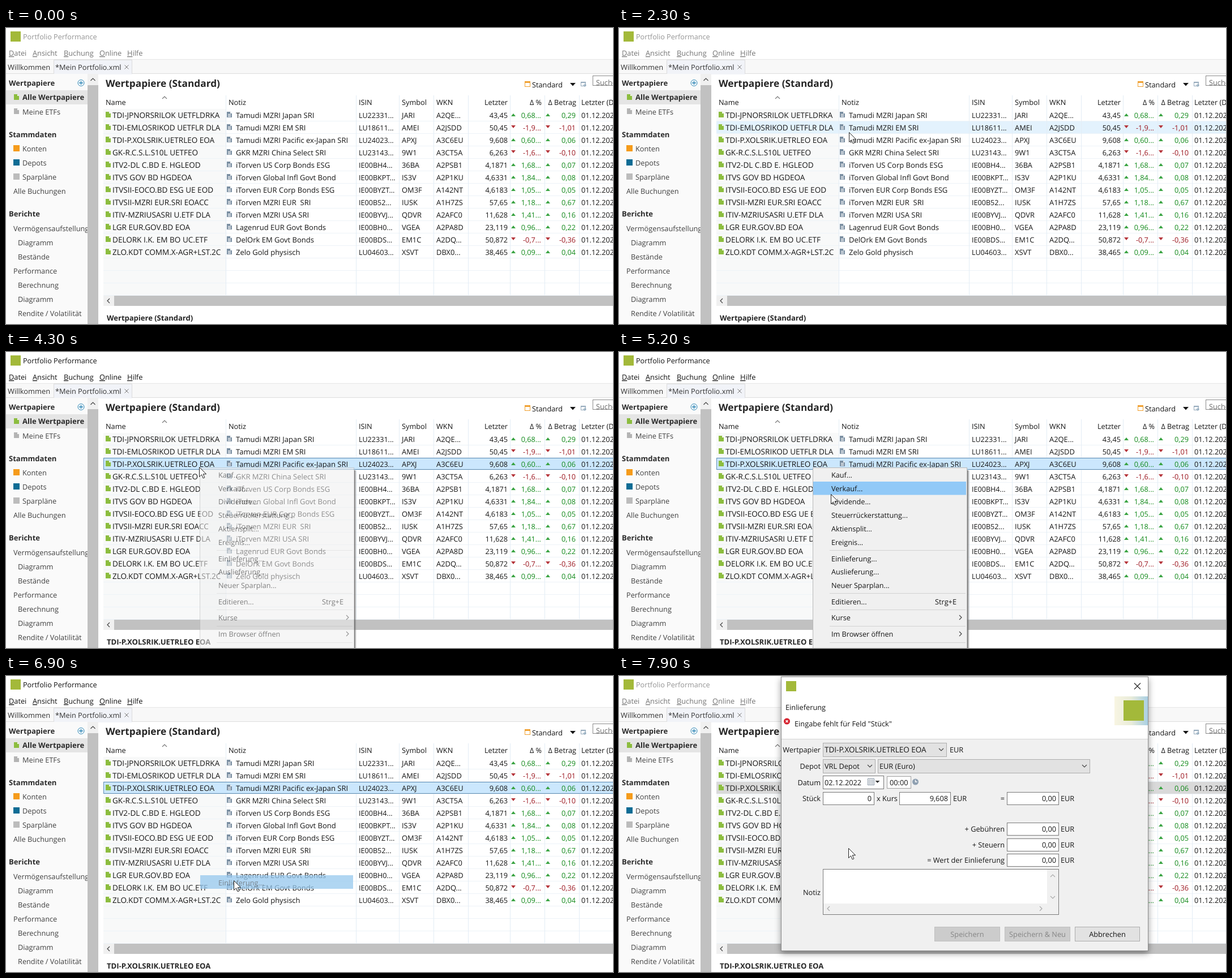
Animation, 1072 px wide and 523 px high, one loop 8000 ms. Source, as an HTML page:

```html
<!DOCTYPE html>
<html lang="de">
<head>
<meta charset="utf-8">
<title>Wertpapiere</title>
<style>
html, body { margin: 0; width: 100%; height: 100%; overflow: hidden; background: #fff; }
svg { display: block; width: 100%; height: 100%; }
text { font-family: "Open Sans", "Noto Sans", sans-serif; white-space: pre; text-rendering: geometricPrecision; }
</style>
</head>
<body>
<svg id="stage" viewBox="0 0 1072 523" xmlns="http://www.w3.org/2000/svg"></svg>
<script>
const LOOP = 8000;
const INK = '#161616', GREEN = '#138a1c', RED = '#9c1720', LOGO = '#a3b93a', BAR = '#c1c1c1';

const rect = (x, y, w, h, fill, more = '') =>
  `<rect x="${x}" y="${y}" width="${w}" height="${h}" fill="${fill}" ${more}/>`;
const box = (x, y, w, h, fill, line) => rect(x + .5, y + .5, w - 1, h - 1, fill, `stroke="${line}"`);
const path = (d, fill = 'none', line = 'none', width = 1) =>
  `<path d="${d}" fill="${fill}" stroke="${line}" stroke-width="${width}"/>`;
// y is the vertical centre of the line; the baseline sits on a whole pixel
const text = (x, y, s, { size = 12.75, fill = INK, bold = 0, end = 0, more = '' } = {}) =>
  `<text x="${x}" y="${Math.round(y + size * .36)}" font-size="${size}" fill="${fill}"${bold ? ' font-weight="700"' : ''}` +
  `${end ? ' text-anchor="end"' : ''} ${more}>${s.replace(/&/g, '&amp;')}</text>`;
const group = (id, body, more = '') => `<g id="${id}" ${more}>${body}</g>`;
const page = (x, y, fill) => path(`M${x} ${y}h6l3 3v7h-9z`, fill) + path(`M${x + 6} ${y}v3h3z`, '#fff');
const note = (x, y) => page(x, y, '#7b8fa2') + path(`M${x + 2} ${y + 4.5}h5m-5 2h5m-5 2h5`, 'none', '#fff');
const chevron = (x, y, dx, dy, line = '#444') => dx
  ? path(`M${x - 2 * dx} ${y - 4}l${4 * dx} 4l${-4 * dx} 4`, 'none', line, 1.2)
  : path(`M${x - 4} ${y - 2 * dy}l4 ${4 * dy}l4 ${-4 * dy}`, 'none', line, 1.2);

const FUND = 'TDI-P.XOLSRIK.UETRLEO EOA';
const rows = [
  'TDI-JPNORSRILOK UETFLDRKA|Tamudi MZRI Japan SRI|LU22331...|JARI|A2QE...|43,45|0,68...|0,29',
  'TDI-EMLOSRIKOD UETFLR DLA|Tamudi MZRI EM SRI|LU18611...|AMEI|A2JSDD|50,45|-1,9...|-1,01',
  FUND + '|Tamudi MZRI Pacific ex-Japan SRI|LU24023...|APXJ|A3C6EU|9,608|0,60...|0,06',
  'GK-R.C.S.L.S10L UETFEO|GKR MZRI China Select SRI|LU23143...|9W1|A3CT5A|6,263|-1,6...|-0,10',
  'ITV2-DL C.BD E. HGLEOD|iTorven US Corp Bonds ESG|IE00BH4...|36BA|A2PSB1|4,1871|1,68...|0,07',
  'ITVS GOV BD HGDEOA|iTorven Global Infl Govt Bond|IE00BKPT...|IS3V|A2P1KU|4,6331|1,84...|0,08',
  'ITVSII-EOCO.BD ESG UE EOD|iTorven EUR Corp Bonds ESG|IE00BYZT...|OM3F|A142NT|4,6183|1,05...|0,05',
  'ITVSII-MZRI EUR.SRI EOACC|iTorven MZRI EUR  SRI|IE00B52...|IUSK|A1H7ZS|57,65|1,18...|0,67',
  'ITIV-MZRIUSASRI U.ETF DLA|iTorven MZRI USA SRI|IE00BYVJ...|QDVR|A2AFC0|11,628|1,41...|0,16',
  'LGR EUR.GOV.BD EOA|Lagenrud EUR Govt Bonds|IE00BH0...|VGEA|A2PA8D|23,119|0,96...|0,22',
  'DELORK I.K. EM BO UC.ETF|DelOrk EM Govt Bonds|IE00BDS...|EM1C|A2DQ...|50,872|-0,7...|-0,36',
  'ZLO.KDT COMM.X-AGR+LST.2C|Zelo Gold physisch|LU04603...|XSVT|DBX0...|38,465|0,09...|0,04'
].map(r => r.split('|'));
const edges = [172, 388, 618, 694, 755, 816, 890, 951, 1012, 1090];
const ROW = 22, TOP = 143;
const rowY = i => TOP + ROW * i;

function drawTop() {
  let s = rect(8, 6, 18, 18, LOGO);
  s += group('appName', text(30, 15.5, 'Portfolio Performance', { size: 12.65, fill: 'currentColor' }));
  s += group('menubar', [[5, 'Datei'], [47, 'Ansicht'], [102, 'Buchung'], [165, 'Online'], [214, 'Hilfe']].map(([x, w]) =>
    text(x, 44, `<tspan text-decoration="underline">${w[0]}</tspan>${w.slice(1)}`, { fill: 'currentColor' })).join(''));
  s += rect(0, 55, 1072, 26, '#f8f8f8') + rect(0, 55, 1072, 1, '#e6e6e6') + rect(0, 80, 1072, 1, '#dedede');
  s += rect(84, 56, 139, 26, '#f1f3f8') + path('M84.5 81V56.500H222.500V81', 'none', '#dcdcdc');
  s += text(3, 69.5, 'Willkommen', { size: 12.9, fill: '#333' }) + text(87, 69.5, '*Mein Portfolio.xml', { fill: '#333' });
  return s + path('M209.500 65.500l7 7m0-7l-7 7', 'none', '#777');
}

function drawSidebar() {
  const heads = [[5, 97, 'Wertpapiere'], [29, 122.5, 'Alle Wertpapiere'], [5, 188, 'Stammdaten'], [5, 328.5, 'Berichte']];
  const items = [[29, 148, 'Meine ETFs'], [29, 213.5, 'Konten'], [29, 238.5, 'Depots'], [29, 263.5, 'Sparpläne'],
    [13, 288.5, 'Alle Buchungen'], [13, 354, 'Vermögensaufstellung'], [21, 379, 'Diagramm'], [21, 404, 'Bestände'],
    [13, 429, 'Performance'], [21, 454, 'Berechnung'], [21, 479, 'Diagramm'], [21, 504, 'Rendite / Volatilität']];
  let s = rect(0, 81, 144, 442, '#fafafa') + rect(0, 110, 144, 25, '#e5e5e5');
  s += heads.map(([x, y, w]) => text(x, y, w, { size: 13.05, bold: 1, fill: '#2c2c2c' })).join('');
  s += items.map(([x, y, w]) => text(x, y, w, { fill: '#404040' })).join('');
  s += page(14, 117, '#8cbd3f') + page(14, 142, '#b4b4b4');
  s += ['#f59b1b', '#0e6c94', '#bcbcbc'].map((c, i) => rect(13, 207 + 25 * i, 11, 11, c)).join('');
  s += `<circle cx="132.500" cy="97" r="5.500" fill="#fff" stroke="#2f86b5"/>` + path('M129 97h7m-3.500-3.500v7', 'none', '#2f86b5', 1.4);
  return `<g clip-path="url(#side)">${s}</g>` + rect(144, 81, 19, 442, '#f0f0f0') +
    rect(144, 101, 19, 422, BAR) + chevron(153.5, 91, 0, -1);
}

function drawTable() {
  let s = text(176, 98, 'Wertpapiere (Standard)', { size: 17.25, bold: 1, fill: '#262626' });
  s += rect(916.5, 95.5, 9, 8, '#fff', 'stroke="#f0a030"') + rect(916, 94, 10, 3, '#f0a030');
  s += text(929, 100, 'Standard') + path('M996 97h10l-5 5.500z', INK);
  s += rect(1015.5, 95.5, 8, 7, '#fff', 'stroke="#93a8ba"') + rect(1015, 95, 9, 2, '#93a8ba') + path('M1019 101h6m-3-3v6', 'none', '#8aa6ba');
  s += rect(1036.5, 84.5, 60, 17, '#fff', 'stroke="#8a8a8a"') +
    `<g clip-path="url(#search)">${text(1042, 96.5, 'Suchen', { fill: '#6c6c6c' })}</g>`;
  s += rect(172, TOP, 216, 329, '#f8f9f9') + group('head', '') + group('hover', '');
  for (let i = 1; i < 16; i++) s += rect(172, rowY(i) - 1, 900, 1, '#edf3f8');
  s += edges.slice(1, -1).map(x => rect(x, 119, 1, 353, '#e3edf5')).join('');
  s += group('pick', '');
  s += [[176, 'Name'], [393, 'Notiz'], [623, 'ISIN'], [699, 'Symbol'], [760, 'WKN'], [1016, 'Letzter (Datum)']]
    .map(([x, w]) => text(x, 131.5, w)).join('');
  s += [[886, 'Letzter'], [946, 'Δ %'], [1007, 'Δ Betrag']].map(([x, w]) => text(x, 131.5, w, { end: 1 })).join('');
  s += chevron(280, 123, 0, -1, '#777');
  rows.forEach((r, i) => {
    const y = rowY(i) + ROW / 2, down = r[6][0] === '-', fill = down ? RED : GREEN;
    const mark = x => path(down ? `M${x - 4} ${y - 4}h8l-4 5z` : `M${x - 4} ${y + 2}h8l-4-5z`, down ? '#b5353b' : '#3aa443');
    s += page(176, y - 6, '#8cbd3f') + text(188, y, r[0], { size: 13.55 });
    s += note(390, y - 6) + text(406, y, r[1], { size: 13 });
    s += text(623, y, r[2], { size: 12.6 }) + text(699, y, r[3], { size: 12.9 }) + text(760, y, r[4], { size: 12.9 });
    s += text(886, y, r[5], { end: 1 }) + mark(896) + text(945, y, r[6], { end: 1, fill });
    s += mark(957) + text(1006, y, r[7], { end: 1, fill }) + text(1016, y, '01.12.2022');
  });
  s += rect(172, 473, 900, 18, '#f0f0f0') + rect(191, 473, 881, 18, BAR) + chevron(181, 482, -1, 0);
  return s + group('titleAll', text(178, 512, 'Wertpapiere (Standard)', { size: 13, bold: 1, fill: '#262626' })) +
    group('titleOne', text(178, 512, FUND, { size: 13.1, bold: 1, fill: '#262626' }));
}

const items = [[217.5, 'Kauf...'], [241, 'Verkauf...'], [264.5, 'Dividende...'], [288.5, 'Steuerrückerstattung...'],
  [312, 'Aktiensplit...'], [336, 'Ereignis...'], [365, 'Einlieferung...'], [388.5, 'Auslieferung...'],
  [412, 'Neuer Sparplan...'], [441, 'Editieren...'], [469.5, 'Kurse'], [498.5, 'Im Browser öffnen'], [528, 'Wertpapier laden']];

function drawMenu() {
  let s = box(342, 204, 273, 340, '#f0f0f0', '#b8b8b8') + group('menuHover', '');
  s += items.map(([y, w]) => text(375, y, w, { size: 12.65 })).join('');
  s += [350, 426, 455, 484, 513].map(y => rect(372, y, 240, 1, '#d2d2d2')).join('');
  s += text(596, 441, 'Strg+E', { end: 1 }) + chevron(603, 469, 1, 0) + chevron(603, 498, 1, 0);
  return group('shadow', rect(615, 209, 2, 320, '#666', 'opacity=".75"') + rect(617, 210, 2, 320, '#888', 'opacity=".25"')) + group('menu', s);
}

function drawDialog() {
  const label = (x, y, w) => text(x, y, w, { end: 1 });
  const field = (x, y, w, value) => box(x, y, w, 23, '#fff', '#7a7a7a') + text(x + w - 5, y + 11.5, value, { end: 1 });
  const combo = (x, y, w, value, size) => box(x, y, w, 25, '#e2e2e2', '#adadad') +
    text(x + 3, y + 12.5, value, { size }) + chevron(x + w - 10, y + 12, 0, 1);
  const button = (x, w, word, off) => box(x, 443, w, 26, off ? '#cccccc' : '#e2e2e2', off ? '#bfbfbf' : '#adadad') +
    text(x + w / 2, 456.5, word, { fill: off ? '#858585' : INK, more: 'text-anchor="middle"' });
  let s = rect(286, 1, 649, 485, '#f0f0f0', 'filter="url(#soft)"') + rect(286, 1, 649, 111, '#fff') + rect(286, 111, 649, 1, '#d5d5d5');
  s += rect(875, 36, 59, 51, 'url(#banner)') + rect(891, 43, 36, 36, LOGO) + rect(295, 9, 18, 18, LOGO);
  s += path('M910 12.500l11 11m0-11l-11 11', 'none', '#222', 1.1);
  s += text(294, 55.5, 'Einlieferung') + text(310, 84, 'Eingabe fehlt für Feld "Stück"');
  s += '<circle cx="296.500" cy="80" r="5.500" fill="#d51f2c"/>' + path('M294.500 78l4 4m0-4l-4 4', 'none', '#fff', 1.5);
  s += [[130.5, 'Wertpapier'], [159.5, 'Depot'], [188, 'Datum'], [216.5, 'Stück'], [382, 'Notiz']].map(([y, w]) => label(356, y, w)).join('');
  s += combo(360, 118, 219, FUND, 13.5) + text(584, 130.5, 'EUR');
  s += combo(360, 147, 93, 'VRL Depot') + combo(457, 147, 375, 'EUR (Euro)');
  s += box(360, 176, 108, 24, '#fff', '#7a7a7a') + text(363, 188, '02.12.2022');
  s += rect(439.5, 181.5, 11, 11, '#f4f4f4', 'stroke="#8a98a8"') + path('M439 185.500h12m-12 3.500h12m-8-7.500v11m4-11v11', 'none', '#a9b4c0') + path('M452.500 185h8l-4 4z', '#333');
  s += box(473, 177, 43, 22, '#fff', '#a0a0a0') + text(478, 188, '00:00') +
    '<circle cx="523.500" cy="187" r="5.500" fill="#8fa0b1"/>' + path('M523.500 183.500v3.500h3', 'none', '#fff', 1.3);
  s += field(360, 205, 91, '0') + text(455, 216.5, 'x Kurs') + field(495, 205, 91, '9,608') + text(590, 216.5, 'EUR');
  [[205, '='], [259, '+ Gebühren'], [287, '+ Steuern'], [314, '= Wert der Einlieferung']].forEach(([y, w]) => {
    s += label(681, y + 11.5, w) + field(685, y, 92, '0,00') + text(780, y + 11.5, 'EUR');
  });
  s += box(360, 341, 417, 81, '#fff', '#7a7a7a') + rect(756, 342, 20, 79, '#f0f0f0') + rect(361, 402, 415, 19, '#f0f0f0');
  s += chevron(766, 353, 0, -1, '#aaa') + chevron(766, 391, 0, 1, '#aaa') + chevron(370, 411, -1, 0, '#aaa') + chevron(745, 411, 1, 0, '#aaa');
  s += button(557, 116, 'Speichern', true) + button(681, 116, 'Speichern & Neu', true) + button(805, 115, 'Abbrechen');
  return group('dialog', s + box(286, 1, 649, 485, 'none', '#8d8d8d'));
}

const stage = document.getElementById('stage');
stage.innerHTML = `<defs>
  <clipPath id="side"><rect y="81" width="144" height="442"/></clipPath>
  <clipPath id="search"><rect x="1037" y="85" width="60" height="16"/></clipPath>
  <linearGradient id="banner"><stop stop-color="#f8f5e2"/><stop offset=".5" stop-color="#e9ecda"/><stop offset="1" stop-color="#a9cfe3"/></linearGradient>
  <filter id="soft" x="-10%" y="-10%" width="120%" height="120%"><feDropShadow dx="0" dy="4" stdDeviation="6" flood-opacity=".4"/></filter>
</defs>` + rect(0, 0, 1072, 523, '#fff') + drawTop() + drawSidebar() + drawTable() + drawMenu() +
  group('ghost', rect(343, 352, 270, 24, '#96c8ee') + text(375, 365, 'Einlieferung...', { size: 12.65, fill: '#4a5a68' }), 'opacity=".75"') +
  drawDialog() +
  group('arrow', path('M.5.500V17.500L4.500 13.700L7.200 20L9.900 18.800L7.200 12.700H12.600Z', '#fff', '#222')) +
  group('beam', path('M-3-8h2.500m1 0h2.500M0-7.500V7.500M-3 8h2.500m1 0h2.500', 'none', '#222'));

const el = Object.fromEntries([...stage.querySelectorAll('g[id]')].map(g => [g.id, g]));
const show = (g, on) => g.setAttribute('visibility', on ? 'visible' : 'hidden');

// time, x, y of the pointer
const track = [[700, 1058, 36], [1500, 542, 138], [1800, 542, 138], [1900, 535, 145], [2500, 341, 203], [4900, 341, 203],
  [5600, 418, 316], [5800, 412, 335], [6100, 402, 361], [7700, 402, 361], [7900, 405, 304]];

function pointerAt(t) {
  const i = track.findIndex(k => k[0] > t);
  if (i < 0) return track[track.length - 1].slice(1);
  const [a, b] = [track[i - 1], track[i]];
  const u = (t - a[0]) / (b[0] - a[0]);
  return [a[1] + (b[1] - a[1]) * u, a[2] + (b[2] - a[2]) * u];
}

function render(ms) {
  const t = Math.floor(ms / 100) * 100;
  const seen = t >= 700;
  const [x, y] = seen ? pointerAt(t) : [0, 0];
  const menuOn = t >= 4300 && t < 6900;
  const dialogOn = t >= 7100;
  const active = t >= 3200 && !dialogOn;
  const picked = t >= 3200;

  el.appName.setAttribute('color', active ? '#111' : '#949494');
  el.menubar.setAttribute('color', active ? '#111' : '#747474');

  const col = edges.findIndex((e, i) => x >= e && x < edges[i + 1]);
  const onHead = seen && t < 1900 && y >= 119 && y < TOP && col >= 0;
  el.head.innerHTML = onHead ? rect(edges[col], 119, edges[col + 1] - edges[col], 24, '#d9ebf9') : '';

  const row = Math.floor((y - TOP) / ROW);
  const strip = (i, fill) => rect(172, rowY(i), 900, ROW - 1, fill);
  el.hover.innerHTML = t >= 1900 && !picked ? strip(row, '#e3f2fd') : '';
  el.pick.innerHTML = !picked ? '' : dialogOn ? strip(2, '#d9d9d9')
    : strip(2, '#cbe7fd') + (t >= 3500 ? box(172, rowY(2), 910, ROW - 1, 'none', '#5e8db3') : '');

  show(el.titleAll, t < 3500);
  show(el.titleOne, t >= 3500);

  show(el.menu, menuOn);
  show(el.shadow, menuOn);
  el.menu.setAttribute('opacity', t < 4400 ? .55 : 1);
  const item = t >= 5000 && items.find(k => Math.abs(y - k[0]) <= 12);
  el.menuHover.innerHTML = item ? rect(343, Math.round(item[0]) - 12, 270, 23.5, '#91c9f7') : '';
  show(el.ghost, t === 6900);

  show(el.dialog, dialogOn);
  const open = Math.min(1, Math.max(0, (t - 7000) / 300));
  const ease = 1 - (1 - open) ** 2;
  const scale = .92 + .08 * ease;
  el.dialog.setAttribute('opacity', ease);
  el.dialog.setAttribute('transform', `translate(610 243) scale(${scale}) translate(-610 -243)`);

  const typing = dialogOn && y > 341;
  show(el.arrow, seen && !typing);
  show(el.beam, typing);
  for (const g of [el.arrow, el.beam]) g.setAttribute('transform', `translate(${Math.round(x)} ${Math.round(y)})`);
}

const start = performance.now();
function tick() {
  render((performance.now() - start) % LOOP);
  requestAnimationFrame(tick);
}
tick();
</script>
</body>
</html>
```
